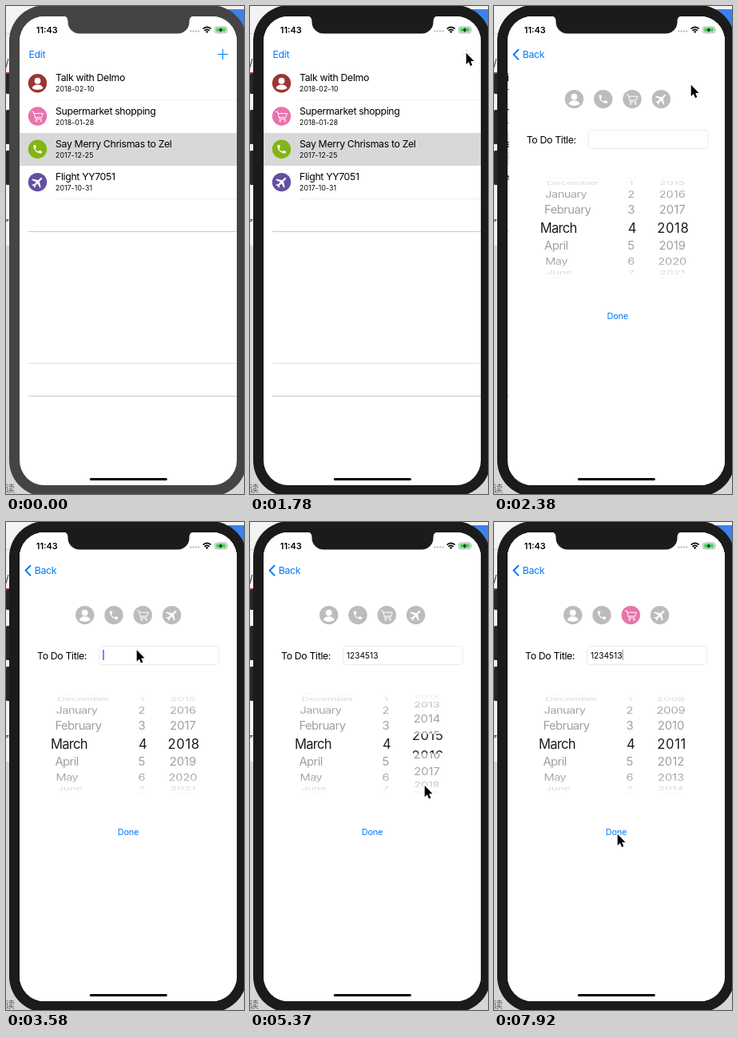
These frames come from a looping animation (298x611 px, 8 s). An HTML page:

```html
<!DOCTYPE html>
<html lang="en">
<head>
<meta charset="utf-8">
<title>To-do list</title>
<style>
  html, body { margin: 0; width: 100%; height: 100%; overflow: hidden; background: #ececec; }
  svg { display: block; width: 298px; height: 611px; }
  text { font-family: Inter, Roboto, sans-serif; }
  .body { font-size: 12.3px; letter-spacing: -.34px; }
  .date { font-size: 8.7px; letter-spacing: .12px; }
  .field { font-size: 10.15px; }
  .cjk { font: 12px "Noto Sans CJK SC", "Noto Sans CJK JP", "Noto Sans CJK", sans-serif; }
  .blue { fill: #007aff; }
  .month { letter-spacing: -.55px; }
  .mid { text-anchor: middle; }
  .rows { font-size: 14.9px; fill: #9c9c9c; }
  .chosen { font-size: 16.6px; fill: #1c1c1c; }
  .chosen .month { letter-spacing: -.75px; }
  .chosen .mid { letter-spacing: .6px; }
</style>
</head>
<body>
<svg viewBox="0 0 298 611">
  <defs>
    <clipPath id="screen"><rect x="17" y="13" width="272" height="587" rx="31"/></clipPath>
    <clipPath id="band"><rect x="17" y="265.2" width="272" height="24.6"/></clipPath>
    <clipPath id="offBand"><path d="M17,205H289V265.2H17ZM17,289.8H289V350H17Z"/></clipPath>
    <linearGradient id="fade" x1="0" y1="0" x2="0" y2="1">
      <stop offset="0" stop-color="#fff"/>
      <stop offset=".2" stop-color="#fff" stop-opacity="0"/>
      <stop offset=".8" stop-color="#fff" stop-opacity="0"/>
      <stop offset="1" stop-color="#fff"/>
    </linearGradient>
    <g id="person" fill="#fff">
      <circle cy="-3" r="3.9"/>
      <path d="M-7,6.2C-6.2,3 -3,1.7 0,1.7S6.2,3 7,6.2Q4,8.3 0,8.3T-7,6.2Z"/>
    </g>
    <path id="phone" fill="#fff" transform="scale(.58) translate(-12,-12)" d="M6.6,10.8c1.4,2.8 3.8,5.1 6.6,6.6l2.2,-2.2c.3,-.3 .7,-.4 1,-.2 1.1,.4 2.3,.6 3.6,.6 .6,0 1,.4 1,1V20c0,.6 -.4,1 -1,1C10.6,21 3,13.4 3,4c0,-.6 .5,-1 1,-1h3.5c.6,0 1,.4 1,1 0,1.3 .2,2.5 .6,3.6 .1,.3 0,.7 -.2,1z"/>
    <g id="cart" fill="none" stroke="#fff" stroke-linejoin="round">
      <path d="M-7.6,-5.6h2.5l2.6,9h7.8M-4.4,-3.4H7L5.2,1.4H-3"/>
      <circle cx="-1.6" cy="5.8" r="1"/><circle cx="4.2" cy="5.8" r="1"/>
    </g>
    <path id="plane" fill="#fff" transform="rotate(45) scale(.76) translate(-11.5,-12)" d="M21,16v-2l-8,-5V3.5C13,2.7 12.3,2 11.5,2S10,2.7 10,3.5V9l-8,5v2l8,-2.5V19l-2,1.5V22l3.5,-1 3.5,1v-1.5L13,19v-5.5z"/>
  </defs>

  <!-- desktop behind the phone -->
  <rect width="298" height="611" fill="#f3f3f3"/>
  <rect y="300" width="298" height="311" fill="#d6d6d6"/>
  <rect y="34" width="8" height="1" fill="#cfcfcf"/>
  <rect x="278" y="4" width="20" height="40" fill="#3b82f0"/>
  <text x="-1" y="76" font-size="13" fill="#333">/</text>
  <text class="cjk" lang="zh-CN" x="-7" y="277" fill="#333">了</text>
  <text class="cjk" lang="zh-CN" x="-1" y="609" fill="#666">读</text>
  <g fill="#262626">
    <rect x="0" y="84" width="6" height="26" rx="1.5"/>
    <rect x="0" y="130" width="6" height="43" rx="1.5"/>
    <rect x="0" y="181" width="6" height="43" rx="1.5"/>
  </g>
  <rect x="0" y="83" width="4" height="1.5" fill="#c0392b"/>

  <rect id="bezel" x="4" y="-1" width="297.5" height="615" rx="45"/>
  <g clip-path="url(#screen)">
    <rect x="17" y="13" width="272" height="587" fill="#fff"/>
    <g id="list"></g>
    <g id="form">
      <rect x="17" y="13" width="272" height="587" fill="#fff"/>
      <g id="kinds"></g>
      <text class="body" x="39" y="171.7">To Do Title:</text>
      <rect x="116.5" y="155.5" width="150" height="23" rx="3.6" fill="#fff" stroke="#ebebeb"/>
      <text class="field" id="entry" x="121" y="170.6"></text>
      <rect id="caret" y="160" height="13"/>
      <g id="picker"></g>
      <rect x="17" y="209" width="272" height="137" fill="url(#fade)"/>
      <text class="blue mid" x="153" y="392" font-size="10.9" letter-spacing="-.17">Done</text>
    </g>
    <rect x="17" y="13" width="272" height="62" fill="#fff"/>
    <g id="listNav">
      <text class="body blue" x="28.5" y="65">Edit</text>
      <path id="plus" d="M265,60.5h13M271.5,54v13" stroke="#007aff"/>
    </g>
    <g id="formNav">
      <path d="M31,54.2L24.6,60.8L31,67.4" fill="none" stroke="#007aff" stroke-width="2"/>
      <text class="body blue" x="35.7" y="65">Back</text>
    </g>
    <text x="37.8" y="33.6" font-size="10.9" font-weight="600">11:43</text>
    <g fill="#c4c4c4">
      <circle cx="231.3" cy="31.5" r="1.2"/><circle cx="234.7" cy="31.5" r="1.2"/>
      <circle cx="238.1" cy="31.5" r="1.2"/><circle cx="241.5" cy="31.5" r="1.2"/>
    </g>
    <g fill="none" stroke="#000" stroke-width="1.7">
      <path d="M246.6,28.6Q251.6,24 256.6,28.6M248.5,30.8Q251.6,28 254.7,30.8"/>
      <path d="M251.6,34l-1.8,-2Q251.6,30.6 253.4,32Z" fill="#000" stroke="none"/>
    </g>
    <rect x="261.5" y="26" width="15" height="7.8" rx="2" fill="#fff" stroke="#999" stroke-width=".8"/>
    <rect x="262.8" y="27.3" width="12.4" height="5.2" rx="1" fill="#4cd964"/>
    <path d="M277.6,28.6q1.2,1.3 0,2.6z" fill="#999"/>
    <path d="M270,26.4l-4,4h2.6l-1,3.2 4,-4h-2.6z" fill="#111"/>
    <rect x="104.8" y="591" width="97" height="3" rx="1.5"/>
  </g>
  <path id="notch" d="M71,12Q77.5,13 77.5,19V20A14.5,14.5 0 0 0 92,34.6H215A14.5,14.5 0 0 0 229.5,20V19Q229.5,13 236,12Z"/>
  <path id="cursor" d="M0,0V14.2L3.2,11.2L5.3,16.4L7.6,15.4L5.5,10.3H9.8Z" stroke="#fff" stroke-width="1.8" paint-order="stroke"/>
</svg>
<script>
const LOOP = 8000, TICK = 149.6, LEAD = 18;
const SCREEN_W = 272;
const $ = id => document.getElementById(id);
const set = (id, attrs) => {
  for (const name in attrs) $(id).setAttribute(name, attrs[name]);
};

// Linear value along [tick, value] points
function along(points, n) {
  if (n <= points[0][0]) return points[0][1];
  for (let i = 1; i < points.length; i++) {
    const [a, from] = points[i - 1], [b, to] = points[i];
    if (n <= b) return from + (to - from) * (n - a) / (b - a);
  }
  return points[points.length - 1][1];
}

const badge = (glyph, color, x, y) =>
  `<g transform="translate(${x},${y})"><circle r="11.7" fill="${color}"/><use href="#${glyph}"/></g>`;

// List page
const todos = [
  ['person', '#9c3433', 'Talk with Delmo', '2018-02-10'],
  ['cart', '#e873ab', 'Supermarket shopping', '2018-01-28'],
  ['phone', '#84b414', 'Say Merry Chrismas to Zel', '2017-12-25'],
  ['plane', '#64509f', 'Flight YY7051', '2017-10-31']
];
const rule = (x, y, color) => `<path d="M${x},${y + .5}H289" stroke="${color}"/>`;
$('list').innerHTML =
  '<rect x="17" y="159" width="272" height="41" fill="#d8d8d8"/>' +
  rule(62, 117, '#f4f4f4') + rule(62, 241, '#eee') +
  rule(28, 282, '#c8c8c8') + rule(28, 447, '#dedede') + rule(28, 488, '#c8c8c8') +
  todos.map(([glyph, color, title, date], i) => {
    const y = i * 41.3;
    return badge(glyph, color, 39.5, 96.7 + y) +
      `<text class="body" x="62" y="${94.2 + y}">${title}</text>` +
      `<text class="date" x="62" y="${107.3 + y}">${date}</text>`;
  }).join('');

// Date picker: rows wrapped on a cylinder, magnified inside the middle band
const WHEEL = { y: 277.5, radius: 62.8, step: 21 * Math.PI / 180, zoom: 1.1 };
const months = ['January', 'February', 'March', 'April', 'May', 'June', 'July',
  'August', 'September', 'October', 'November', 'December'];
const wrap = (v, n) => (v % n + n) % n;
const columns = {
  month: { label: v => months[wrap(v, 12)], cls: 'month', x: p => 128 - 67 * p, chosenX: 56 },
  day: { label: v => wrap(v - 1, 31) + 1, cls: 'mid', x: () => 170, chosenX: 171.6 },
  year: { label: v => v, cls: 'mid', x: () => 221.5, chosenX: 222.6 }
};

function wheel({ label, cls, x, chosenX }, pos) {
  let rows = '', chosen = '';
  for (let v = Math.ceil(pos - 4.2); v <= pos + 4.2; v++) {
    const angle = (v - pos) * WHEEL.step, cos = Math.cos(angle);
    const dy = WHEEL.radius * Math.sin(angle), p = 1 - .09 * (1 - cos);
    const row = (left, shift, sx, opacity) =>
      `<text class="${cls}" dy=".364em" opacity="${opacity}" transform="translate(${left},${WHEEL.y + shift}) scale(${sx},${cos})">${label(v)}</text>`;
    rows += row(x(p), dy, p, .35 + .65 * Math.sqrt(Math.max(cos, 0)));
    if (Math.abs(v - pos) < 1.2) chosen += row(chosenX, dy * WHEEL.zoom, 1, 1);
  }
  return `<g class="rows" clip-path="url(#offBand)">${rows}</g>` +
    `<g class="chosen" clip-path="url(#band)">${chosen}</g>`;
}

// Motion, in ticks
const pointer = [
  [5, 292, 330], [6, 288, 270], [7, 283, 190], [8, 278, 120], [9, 273, 76], [10, 270.7, 58.7],
  [14, 270.7, 58.7], [15, 262, 74], [16, 246.7, 98.7], [17, 216, 124], [18, 188, 145],
  [19, 170, 156], [20, 163.2, 158.2], [21, 163.7, 160.2], [32, 163.7, 160.2],
  [33, 190, 205], [34, 222, 267], [35, 221, 298], [36, 218.7, 330], [37, 226, 318],
  [39, 226, 318], [41, 216, 268], [43, 196.7, 186.7], [44, 184, 146], [45, 175, 121], [46, 174, 117.5],
  [48, 174, 117.5], [49, 171, 160], [50, 165, 255], [51, 158, 345], [52, 154.7, 390.7]
];
const pointerX = pointer.map(([n, x]) => [n, x]);
const pointerY = pointer.map(([n, , y]) => [n, y]);
const push = [[13, SCREEN_W], [14, 180], [15, 22], [16, 1.7], [17, 0]];
const year = [[34, 2018], [35, 2016.9], [36, 2015.41], [37, 2012], [38, 2011]];
const typing = [[31, '1234513'], [29, '12345'], [28, '123'], [27, '1']];
const caretOn = [[24, 33], [40, 42], [46, 49], [53, 54]];

function draw(n) {
  set('bezel', { fill: n < 10 ? '#444' : '#1b1b1b' });
  set('notch', { fill: n < 10 ? '#444' : '#1b1b1b' });
  set('plus', { opacity: n < 12 ? 1 : .2 });

  const shift = along(push, n), shown = 1 - shift / SCREEN_W;
  set('list', { transform: `translate(${-.3 * SCREEN_W * shown},0)` });
  set('form', { transform: `translate(${shift},0)` });
  set('listNav', { opacity: 1 - shown });
  set('formNav', { opacity: shown });

  $('kinds').innerHTML = ['person', 'phone', 'cart', 'plane'].map((glyph, i) =>
    badge(glyph, glyph === 'cart' && n >= 47 ? '#e873ab' : '#bcbcbc', 98.7 + 36.3 * i, 116.6)).join('');

  const typed = typing.find(([from]) => n >= from);
  $('entry').textContent = typed ? typed[1] : '';
  const fading = n >= 53;
  set('caret', {
    x: 121.2 + (typed ? $('entry').getComputedTextLength() : 0),
    width: fading ? .8 : 1.6,
    fill: fading ? '#556' : '#4a6fe3',
    opacity: caretOn.some(([a, b]) => n >= a && n <= b) ? 1 : 0
  });

  $('picker').innerHTML = wheel(columns.month, 2) + wheel(columns.day, 4) +
    wheel(columns.year, along(year, n));

  set('cursor', {
    transform: `translate(${along(pointerX, n)},${along(pointerY, n)})`,
    opacity: n < 5 ? 0 : 1
  });
}

const start = performance.now();
let last = -1;
function frame() {
  const t = (performance.now() - start) % LOOP;
  const n = Math.min(53, Math.floor((t + LEAD) / TICK));
  if (n !== last) draw(last = n);
  requestAnimationFrame(frame);
}
frame();
</script>
</body>
</html>
```
